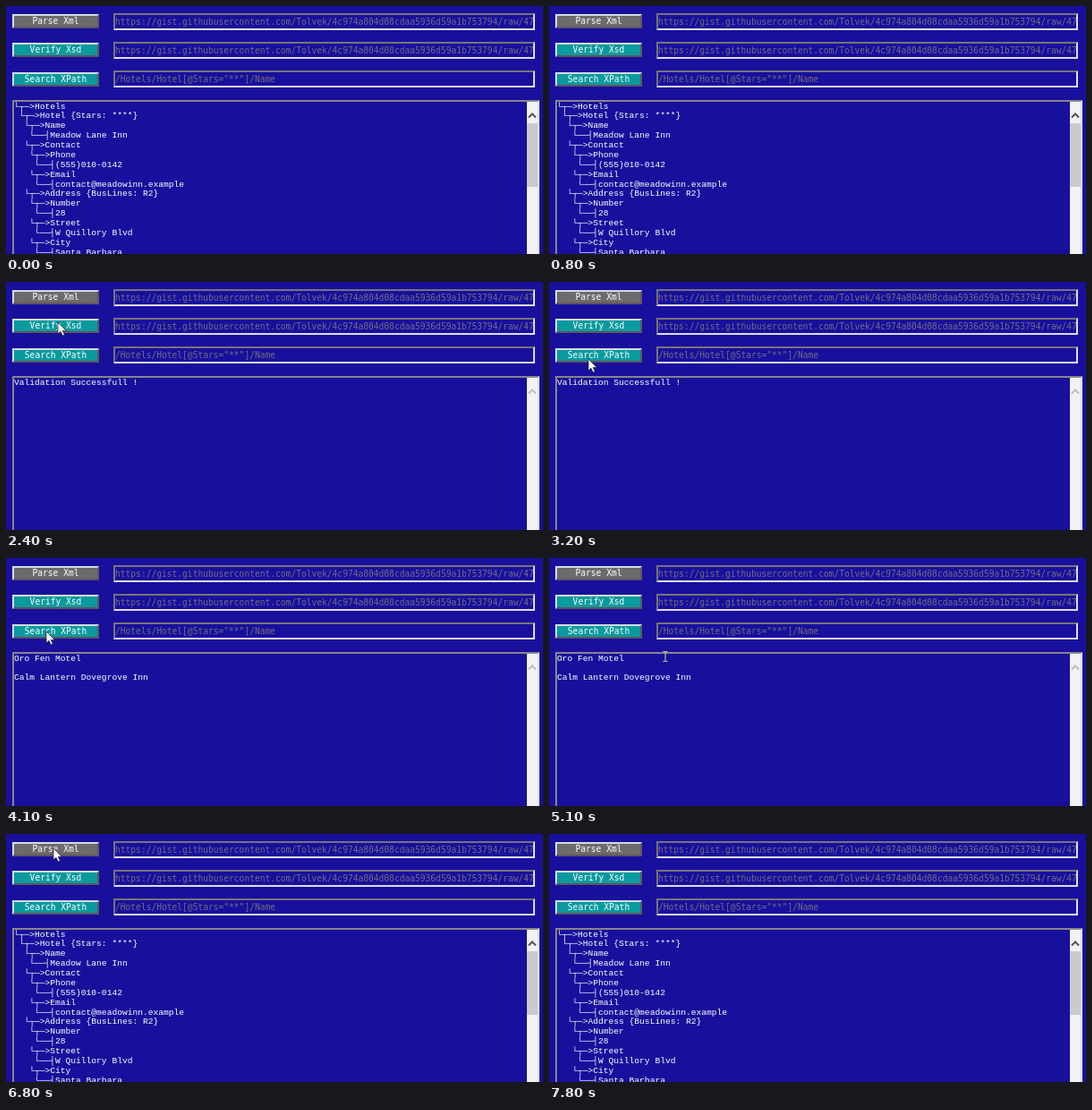
Animation, 600 px wide and 277 px high, one loop 8.7 s. Source, as an HTML page:

```html
<!DOCTYPE html>
<html lang="en">
<head>
<meta charset="utf-8">
<title>XML tool</title>
<style>
  html, body { margin: 0; width: 100%; height: 100%; overflow: hidden; background: #18109c; }
  #stage { position: relative; width: 600px; height: 277px; overflow: hidden; }
  #stage * { position: absolute; box-sizing: border-box; margin: 0; white-space: pre; }
  .button, .field { font: 9.6px/14px "DejaVu Sans Mono", monospace; border: 2px solid; }
  .button {
    left: 7px; width: 97px; height: 16px; line-height: 12px; text-align: center;
    color: #fff; background: #089a9e; border-color: #d3dce0 #62535f #62535f #d3dce0;
  }
  .button.used { background: #6d6a6d; }
  .field {
    left: 120px; width: 471px; height: 19px; line-height: 15px; overflow: hidden;
    color: #716d80; border-color: #77737c #dedbe6 #dedbe6 #77737c;
  }
  #output {
    left: 7px; top: 105px; width: 589px; height: 190px;
    border: 2px solid; border-color: #89858c #dedbe6 #dedbe6 #89858c;
  }
  #text {
    left: 9px; top: 107.5px; color: #fff;
    font: 9.6px/10.87px "Liberation Mono", monospace;
  }
  #track { left: 582px; top: 107px; width: 12px; height: 170px; background: #f2f1f4; }
  #thumb { left: 0; top: 24px; width: 12px; height: 71px; background: #cbcacd; }
  #track svg { left: 1px; top: 11px; }
  #cursor { left: 0; top: 0; overflow: visible; }
</style>
</head>
<body>
<div id="stage">
  <div id="output"></div>
  <pre id="text"></pre>
  <div id="track">
    <svg width="10" height="8"><path id="chevron" d="M1 6.5 5 2.5 9 6.5" fill="none" stroke-width="2"/></svg>
    <div id="thumb"></div>
  </div>
  <svg id="cursor" width="1" height="1">
    <path id="arrow" d="M0 0V13L3 10.2 5.2 15 7.4 14 5.3 9.4H9.4Z" fill="#fff" stroke="#16122c" stroke-width=".7"/>
    <path id="beam" d="M-2.5-5.5H-.7L0-5 .7-5.5H2.5M0-5V5M-2.5 5.5H-.7L0 5 .7 5.5H2.5" fill="none" stroke="#d5d79b"/>
  </svg>
</div>
<script>
const LOOP = 8700, STEP = 100;
const $ = id => document.getElementById(id);

const url = "https://gist.githubusercontent.com/Tolvek/4c974a804d08cdaa5936d59a1b753794/raw/47";
const rows = [
  ["Parse Xml", url, 9],
  ["Verify Xsd", url, 41],
  ["Search XPath", '/Hotels/Hotel[@Stars="**"]/Name', 74],
];

function addBox(className, text, top) {
  const box = document.createElement("div");
  box.className = className;
  box.textContent = text;
  box.style.top = top + "px";
  $("stage").insertBefore(box, $("cursor"));
}
rows.forEach(([label, value, top], i) => {
  addBox(i ? "button" : "button used", label, top);
  addBox("field", value, i === 2 ? top - 2 : top - 1);
});

const node = (depth, name) => " ".repeat(depth) + "└┬─>" + name;
const leaf = (depth, value) => " ".repeat(depth) + "└──┤" + value;
const tree = [
  node(0, "Hotels"),
  node(1, "Hotel {Stars: ****}"),
  node(2, "Name"), leaf(3, "Meadow Lane Inn"),
  node(2, "Contact"),
  node(3, "Phone"), leaf(4, "(555)010-0142"),
  node(3, "Email"), leaf(4, "contact@meadowinn.example"),
  node(2, "Address {BusLines: R2}"),
  node(3, "Number"), leaf(4, "28"),
  node(3, "Street"), leaf(4, "W Quillory Blvd"),
  node(3, "City"), leaf(4, "Santa Barbara"),
].join("\n");

// [start time, output text]
const outputs = [
  [0, tree],
  [2300, "Validation Successfull !"],
  [4000, "Oro Fen Motel\n\nCalm Lantern Dovegrove Inn"],
  [6400, tree],
];

// [time, x, y] of the pointer, linear in between
const path = [
  [0, 150, 295], [800, 150, 295], [1200, 60, 200], [1500, 35, 118],
  [1600, 52, 90], [1800, 56, 74], [2100, 58, 45], [2900, 58, 45],
  [3200, 44, 86], [3300, 45, 82], [4800, 45, 82], [5100, 130, 110],
  [5200, 126, 102], [5600, 62, 30], [5800, 53, 16], [6800, 53, 16],
  [7500, 90, 295], [LOOP, 90, 295],
];

function pointerAt(t) {
  const i = path.findIndex(point => point[0] > t);
  const [t0, x0, y0] = path[i - 1], [t1, x1, y1] = path[i];
  const k = (t - t0) / (t1 - t0);
  return [x0 + (x1 - x0) * k, y0 + (y1 - y0) * k];
}

let shown;
function draw(now) {
  const t = Math.floor(now % LOOP / STEP) * STEP;
  const output = outputs.findLast(([start]) => start <= t)[1];
  if (output !== shown) {
    $("text").textContent = shown = output;
    const scrollable = output === tree;
    $("thumb").style.display = scrollable ? "" : "none";
    $("chevron").setAttribute("stroke", scrollable ? "#55535a" : "#bdbcc2");
  }
  const [x, y] = pointerAt(t);
  const overText = y > 105;
  $("cursor").style.transform = `translate(${x}px, ${y}px)`;
  $("arrow").style.display = overText ? "none" : "";
  $("beam").style.display = overText ? "" : "none";
}

const begin = performance.now();
function tick() {
  draw(performance.now() - begin);
  requestAnimationFrame(tick);
}
tick();
</script>
</body>
</html>
```
